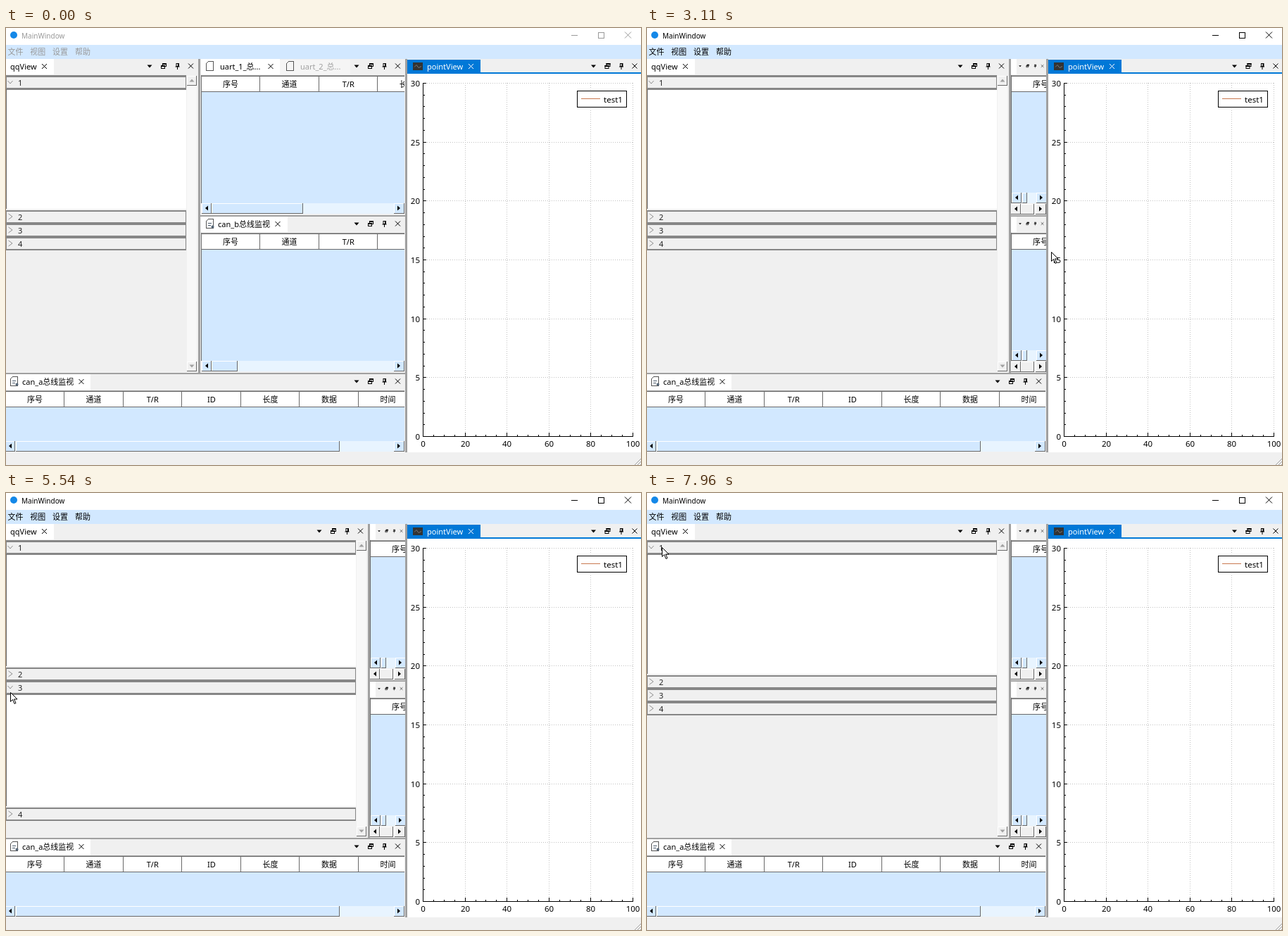
An HTML page with a canvas for the animation above (8000 ms loop, 902 by 621 pixels).

```html
<!DOCTYPE html>
<html lang="zh">
<head>
<meta charset="utf-8">
<style>
html, body { margin: 0; width: 902px; height: 621px; overflow: hidden; }
canvas { display: block; }
</style>
</head>
<body>
<canvas id="stage" width="902" height="621"></canvas>
<script>
const c = document.getElementById('stage').getContext('2d');
const LOOP = 8000, STEP = 60;
const ACTIVE = 1510, DROP = 2260;
const BLUE = '#d2e8ff', FACE = '#f0f0f0', GRAY = '#a0a0a0', EDGE = '#696969', BORDER = '#868686';

function rect(x, y, r, b, color) {
  c.fillStyle = color;
  c.fillRect(x, y, r - x, b - y);
}

function trace(points) {
  c.beginPath();
  points.forEach(([x, y]) => c.lineTo(x, y));
}

function line(points, color = '#000', width = 1) {
  trace(points);
  c.strokeStyle = color;
  c.lineWidth = width;
  c.stroke();
}

function poly(points, color = '#000') {
  trace(points);
  c.fillStyle = color;
  c.fill();
}

function disc(x, y, r, color) {
  c.beginPath();
  c.arc(x, y, r, 0, 7);
  c.fillStyle = color;
  c.fill();
}

function box(x, y, w, h, color = '#000') {
  c.strokeStyle = color;
  c.lineWidth = 1;
  c.strokeRect(x + .5, y + .5, w, h);
}

function text(s, x, y, color = '#000', size = 11, align = 'left') {
  c.font = size + 'px "Noto Sans", "Noto Sans CJK SC", "Noto Sans CJK", sans-serif';
  c.textAlign = align;
  c.fillStyle = color;
  c.fillText(s, x, y + 4);
}

function cross(x, y, s = 3.5, color = '#000') {
  line([[x - s, y - s], [x + s, y + s]], color);
  line([[x - s, y + s], [x + s, y - s]], color);
}

// Dock title buttons: menu, float, pin, close
function tools(x, y, scale = 1) {
  c.save();
  c.translate(x, y);
  c.scale(scale, scale);
  poly([[-3.5, -1.5], [3.5, -1.5], [0, 2.5]]);
  box(18, -4, 5, 4);
  rect(18, -4, 24, -2, '#000');
  rect(16, -1, 22, 4, FACE);
  box(16, -1, 5, 4);
  rect(16, -1, 22, 1, '#000');
  box(37.5, -4, 3, 4);
  rect(40, -4, 42, 1, '#000');
  line([[36.5, 1], [42.5, 1]]);
  line([[39.5, 1], [39.5, 5]]);
  cross(58.5, 0);
  c.restore();
}

function page(x, y, lines) {
  box(x, y, 10, 13, '#555');
  poly([[x, y], [x + 4, y], [x, y + 4]], '#fff');
  line([[x, y + 4], [x + 4, y]], '#555');
  if (!lines) return;
  line([[x + 3, y + 6.5], [x + 8, y + 6.5]], '#456');
  line([[x + 3, y + 9.5], [x + 7, y + 9.5]], '#456');
  disc(x + 9.5, y + 11.5, 2, '#567');
}

function tab(title, x, y, r, b, close, icon) {
  rect(x, y, r, b, '#fff');
  const left = x + 7;
  if (icon) page(left, y + 3, icon === 'lined');
  text(title, icon ? left + (icon === 'lined' ? 17 : 20) : x + 6, y + 11);
  cross(close, y + 10.5);
}

function raised(x, y, r, b, face) {
  rect(x, y, r, b, EDGE);
  rect(x, y, r - 1, b - 1, '#fff');
  rect(x + 1, y + 1, r - 1, b - 1, face);
}

function hScroll(x, r, y, thumb, end, face = BLUE) {
  rect(x, y, r, y + 15, face === BLUE ? '#e8f4ff' : '#f8f8f8');
  raised(x, y, x + 14, y + 15, face);
  raised(r - 15, y, r, y + 15, face);
  raised(thumb, y, end, y + 15, face);
  for (const [tip, d] of [[x + 5, 4], [r - 6, -4]])
    poly([[tip, y + 7], [tip + d, y + 3.5], [tip + d, y + 10.5]]);
}

function vScroll(x) {
  rect(x, 68, x + 14, 488, '#f8f8f8');
  for (const [y, d] of [[68, -2], [474, 2]]) {
    raised(x, y, x + 14, y + 14, FACE);
    poly([[x + 3.5, y + 6.5 - d], [x + 10.5, y + 6.5 - d], [x + 7, y + 6.5 + d]], GRAY);
  }
}

function table(x, r, y, b, labels) {
  c.save();
  c.beginPath();
  c.rect(x, y, r - x, b - y);
  c.clip();
  rect(x, y, r, b, BLUE);
  rect(x, y, r, y + 24, EDGE);
  rect(x, y, r, y + 1, GRAY);
  rect(x, y + 2, r, y + 23, '#fff');
  labels.forEach((s, i) => {
    const left = x + i * 83.6, edge = Math.round(left + 83);
    text(s, left + 42, y + 12.5, '#000', 11, 'center');
    rect(edge, y + 1, edge + 1, y + 24, EDGE);
  });
  rect(x, y, x + 1, b, EDGE);
  c.restore();
}

function section(n, y, width, open, pressed) {
  rect(0, y, width, y + 19, BORDER);
  rect(1, y + 2, width - 1, y + 17, FACE);
  const s = pressed ? 1 : 0, m = y + 9 + s;
  line(open ? [[2.5 + s, m - 2], [6 + s, m + 2], [9.5 + s, m - 2]]
            : [[3.5, m - 4], [9, m], [3.5, m + 4]], '#909090');
  text(n, 17 + s, m + 1, '#222');
}

function body(y, b, width) {
  rect(0, y, width, b, '#fff');
  rect(0, y, width, y + 1, BORDER);
  rect(0, y, 1, b, EDGE);
}

function leftDock(width, open, pressed) {
  rect(0, 44, width + 17, 490, FACE);
  tab('qqView', 0, 44, 68, 66, 54.5);
  tools(width - 52, 54);
  let y = open ? 248 : 259;
  section(1, 68, width, true);
  rect(0, 67, width, 69, BORDER);
  body(87, y - 2, width);
  for (let n = 2; n <= 4; n++) {
    const top = Math.floor(y), isOpen = open === n;
    section(n, top, width, isOpen, isOpen && pressed);
    y += 19.4;
    if (isOpen) {
      body(top + 19, top + 178, width);
      y += 160.6;
    }
  }
  vScroll(width + 1);
  rect(width + 17, 44, width + 20, 490, GRAY);
}

function middleDock(narrow) {
  const x = narrow ? 517 : 277;
  rect(x - 1, 44, 567, 490, FACE);
  if (narrow) {
    for (const y of [44, 268]) {
      rect(x, y, 525, y + 22, '#fff');
      tools(530, y + 10, .54);
      table(x, 567, y + 23, y + 205, ['序号']);
      hScroll(518, 568, y + 190, 533, 540);
      hScroll(517, 567, y + 206, 531, 550, FACE);
    }
  } else {
    tab('uart_1_总...', x, 44, 389, 66, 376, 'plain');
    rect(389, 45, 489, 66, '#f5f5f5');
    page(398, 47);
    text('uart_2_总...', 418, 55, GRAY);
    tab('can_b总线监视', x, 268, 400, 290, 386, 'lined');
    for (const [y, thumb] of [[44, 422], [268, 329]]) {
      tools(498, y + 10);
      table(x, 566, y + 23, y + 205, ['序号', '通道', 'T/R', y === 44 ? '长度' : '']);
      hScroll(278, 566, y + 205, 292, thumb);
    }
  }
  rect(x - 1, 266, 567, 268, GRAY);
}

function bottomDock() {
  rect(0, 490, 567, 603, FACE);
  rect(0, 490, 567, 492, GRAY);
  tab('can_a总线监视', -1, 492, 120, 515, 107, 'lined');
  tools(498, 502);
  table(-1, 566, 515, 587, ['序号', '通道', 'T/R', 'ID', '长度', '数据', '时间']);
  hScroll(-1, 566, 587, 14, 474);
}

function plotDock() {
  rect(567, 44, 570, 603, GRAY);
  rect(570, 44, 902, 603, FACE);
  rect(570, 65, 902, 603, '#fff');
  rect(570, 45, 674, 65, '#0078d7');
  rect(570, 63, 902, 65, '#0078d7');
  rect(578, 49, 592, 60, '#333');
  line([[580, 55.5], [583, 52.5], [586, 56.5], [590, 54.5]], '#777');
  text('pointView', 598, 55, '#fff');
  cross(660.5, 54.5, 3.5, '#fff');
  tools(834.5, 54);
  const px = v => Math.round(592 + v * 2.98) + .5;
  const py = v => Math.round(580 - v * 16.733) + .5;
  c.setLineDash([1, 2]);
  for (let v = 20; v <= 100; v += 20) line([[px(v), 78], [px(v), 580]], '#c0c0c0');
  for (let v = 5; v <= 30; v += 5) line([[592, py(v)], [890, py(v)]], '#c0c0c0');
  c.setLineDash([]);
  line([[592.5, 78], [592.5, 580.5], [891, 580.5]]);
  for (let v = 0; v <= 100; v += 5) {
    const major = v % 20 === 0;
    line([[px(v), 580], [px(v), major ? 575 : 578]]);
    if (major) text(v, px(v), 591, '#000', 11.5, 'center');
  }
  for (let v = 0; v <= 30; v++) {
    const major = v % 5 === 0;
    line([[592, py(v)], [major ? 597 : 595, py(v)]]);
    if (major) text(v, 588, py(v), '#000', 11.5, 'right');
  }
  rect(811, 89, 882, 113, '#fff');
  box(811, 89, 70, 23);
  line([[817, 100.5], [844, 100.5]], '#c87850');
  text('test1', 849, 101.5, '#000', 11.5);
}

function frame(active) {
  rect(0, 0, 902, 621, FACE);
  rect(0, 0, 902, 24, '#fff');
  rect(0, 24, 902, 44, BLUE);
  disc(11, 10, 5, '#1488e8');
  const ink = active ? '#000' : '#999';
  text('MainWindow', 22, 10.5, ink, 10);
  ['文件', '视图', '设置', '帮助'].forEach((s, i) => text(s, 2.5 + i * 31.8, 33.5, ink));
  line([[803, 10.5], [812, 10.5]], ink);
  box(841, 6, 8, 8, ink);
  cross(883.5, 10, 4.5, ink);
  for (let i = 0; i < 3; i++) line([[902, 612 + i * 4], [893 + i * 4, 621]], GRAY);
}

// Pointer moves: start, end, x, y
const moves = [
  [130, 310, 367, 370], [530, 1160, 275, 333],
  [ACTIVE, 1630, 483, 332], [1630, DROP, 562, 330],
  [2320, 2500, 674, 341], [2500, 2770, 574, 318],
  [3200, 3500, 128, 300], [3660, 4100, 6, 298],
  [5100, 5300, 6, 283], [6100, 6350, 3, 262],
  [6760, 6880, 8, 262], [7500, 7740, 27, 77], [7900, 7960, 21, 77]
];

// Clicks: down, up, section toggled
const clicks = [
  [4170, 4290, 4], [4820, 5060, 4], [5360, 5420, 3],
  [5910, 6000, 3], [6400, 6510, 2], [7040, 7280, 2]
];

function pointerAt(t) {
  let x = 756, y = 551;
  for (const [start, end, toX, toY] of moves) {
    if (t < start) break;
    const k = t < end ? Math.floor((t - start) / STEP) * STEP / (end - start) : 1;
    const ease = 1 - (1 - k) ** 2.1;
    x += (toX - x) * ease;
    y += (toY - y) * ease;
  }
  return [Math.round(x), Math.round(y)];
}

function pointer(t, pressed) {
  const [x, y] = pointerAt(t);
  if (pressed) disc(x, y, 9.5, 'rgba(246,240,70,.8)');
  c.save();
  c.translate(x + .5, y + .5);
  if (t >= 1160 && t < DROP) {
    for (const s of [-1, 1]) {
      line([[s, -7], [s, 7]], '#6b6520', .8);
      line([[s * 3, -7], [s * 3, 7]], '#6b6520', .8);
      line([[s * 3, -1], [s * 5, -1], [s * 5, -4], [s * 9, 0], [s * 5, 4], [s * 5, 1], [s * 3, 1]], '#6b6520', .8);
    }
  } else {
    const arrow = [[0, 0], [0, 13], [3, 10], [5.5, 16], [7.5, 15], [5, 9.5], [9.5, 9.5], [0, 0]];
    poly(arrow, '#fff');
    line(arrow);
  }
  c.restore();
}

function draw(t) {
  const dragging = t >= ACTIVE && t < DROP;
  const pressed = t >= 1350 && t < DROP || clicks.some(([down, up]) => t >= down && t < up);
  const open = clicks.reduce((now, [, up, n]) => t < up ? now : now === n ? 0 : n, 0);
  frame(t >= ACTIVE);
  middleDock(t >= DROP);
  leftDock(t >= DROP ? 497 : 256, open, pressed);
  bottomDock();
  plotDock();
  if (dragging) {
    const x = Math.min(515, pointerAt(t - STEP)[0]);
    rect(x - 2, 44, x + 3, 490, '#7c7c7c');
  }
  if (t >= 130) pointer(t, pressed);
}

function tick() {
  draw(performance.now() % LOOP);
  requestAnimationFrame(tick);
}
tick();
</script>
</body>
</html>
```
